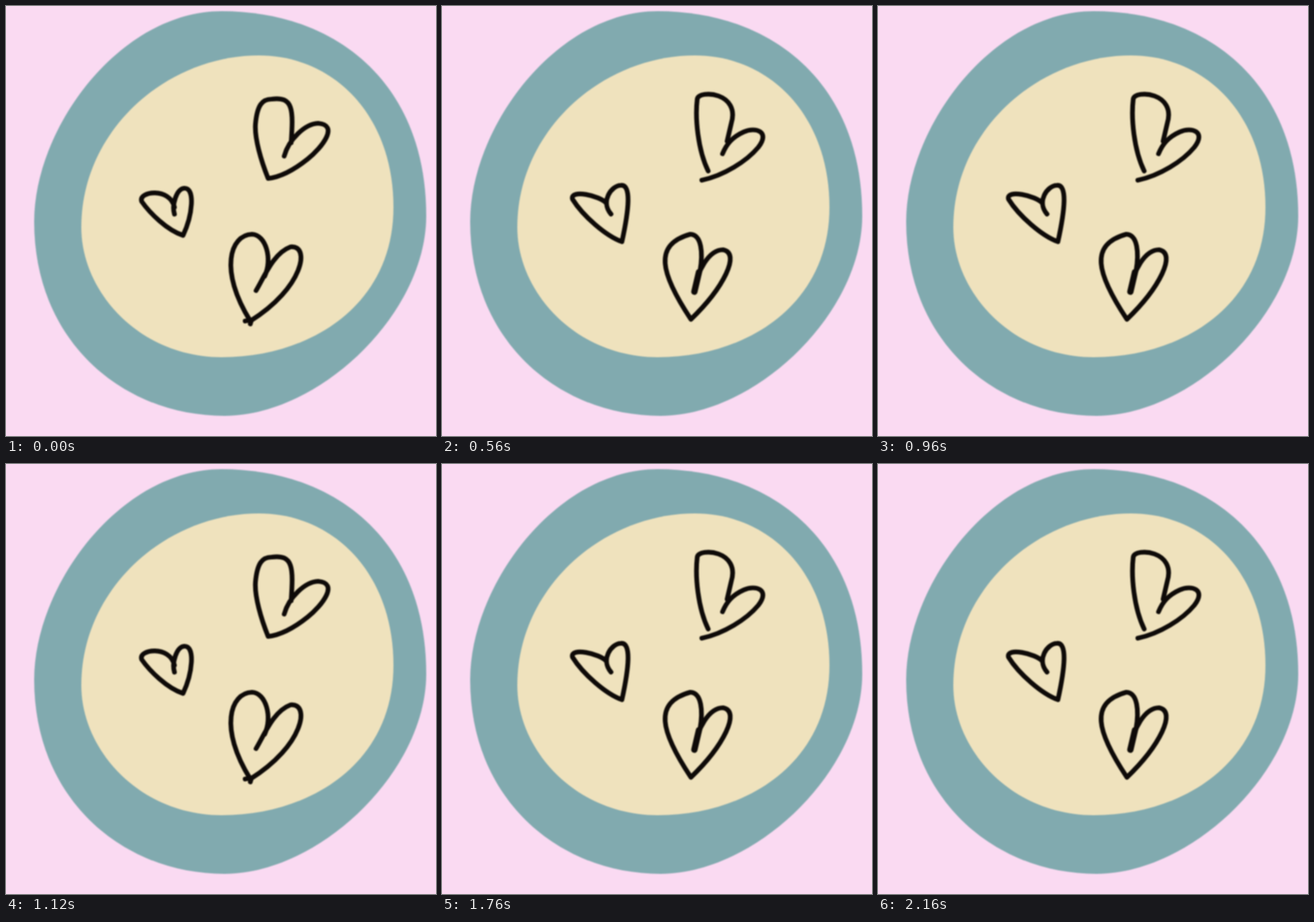
Animation of 748x748 px, one loop 2.4 s. Source, as an HTML page:

```html
<!DOCTYPE html>
<html lang="en">
<head>
<meta charset="utf-8">
<title>Wobbling hearts</title>
<style>
  html, body { margin: 0; width: 100%; height: 100%; overflow: hidden; background: #fadaf2; }
  svg { display: block; width: 100%; height: 100%; }
  .soft { filter: blur(1px); }
  .rim { fill: #81aaaf; }
  .plate { fill: #efe2bd; }
  .pose { fill: none; stroke: #0e0a08; stroke-width: 8.2; stroke-linecap: round; stroke-linejoin: round; }
  .thick { stroke-width: 11; }
  /* The two poses swap on a hard, slightly uneven beat */
  .first { animation: swap 2400ms step-end infinite; --on: 1; --off: 0; }
  .second { animation: swap 2400ms step-end infinite; --on: 0; --off: 1; }
  @keyframes swap {
    0%, 13.333%, 30%, 46.666%, 63.333%, 80% { opacity: var(--on); }
    6.666%, 23.333%, 40%, 56.666%, 73.333%, 90%, 100% { opacity: var(--off); }
  }
</style>
</head>
<body>
<svg viewBox="0 0 748 748">
  <g class="soft">
    <path class="rim" d="M375 9 C575 9 731 135 731 365 C731 535 545 713 380 713 C205 713 49 585 49 375 C49 210 200 9 375 9Z"/>
    <path class="plate" d="M440 86 C570 86 674 190 674 350 C674 520 530 611 375 611 C235 611 131 500 131 385 C131 215 280 86 440 86Z"/>
  </g>
  <g class="soft">
    <g class="pose first">
      <path d="M484 261 C492 232 520 205 543 204 C580 207 550 246 525 266 C505 282 482 297 456 300 C444 270 432 230 434 205 C437 172 446 162 462 162 C500 157 500 180 496 238"/>
      <path d="M293 362 C288 345 297 318 310 317 C330 316 324 365 308 399 C280 390 250 360 236 340 C230 322 285 315 293 350"/>
      <path d="M435 495 C450 470 465 430 495 419 C530 415 518 490 425 548 C370 460 390 398 428 397 C452 398 464 440 450 470"/>
      <path d="M416 548 L427 546 L425 553"/>
    </g>
    <g class="pose second">
      <path d="M452 303 C490 295 530 270 550 246 C572 218 545 210 525 219 C505 228 495 240 488 257"/>
      <path d="M463 287 C445 250 440 195 444 162 C447 145 520 150 503 205 L496 235"/>
      <path d="M294 362 C275 340 295 312 311 312 C330 310 325 355 313 410 C285 400 245 365 227 336 C222 318 275 330 286 343"/>
      <path d="M440 497 C443 460 465 424 489 424 C520 430 490 490 433 545 C380 465 367 415 432 397 C452 398 454 430 449 460"/>
      <path class="thick" d="M447 463 L439 497"/>
    </g>
  </g>
</svg>
</body>
</html>
```
